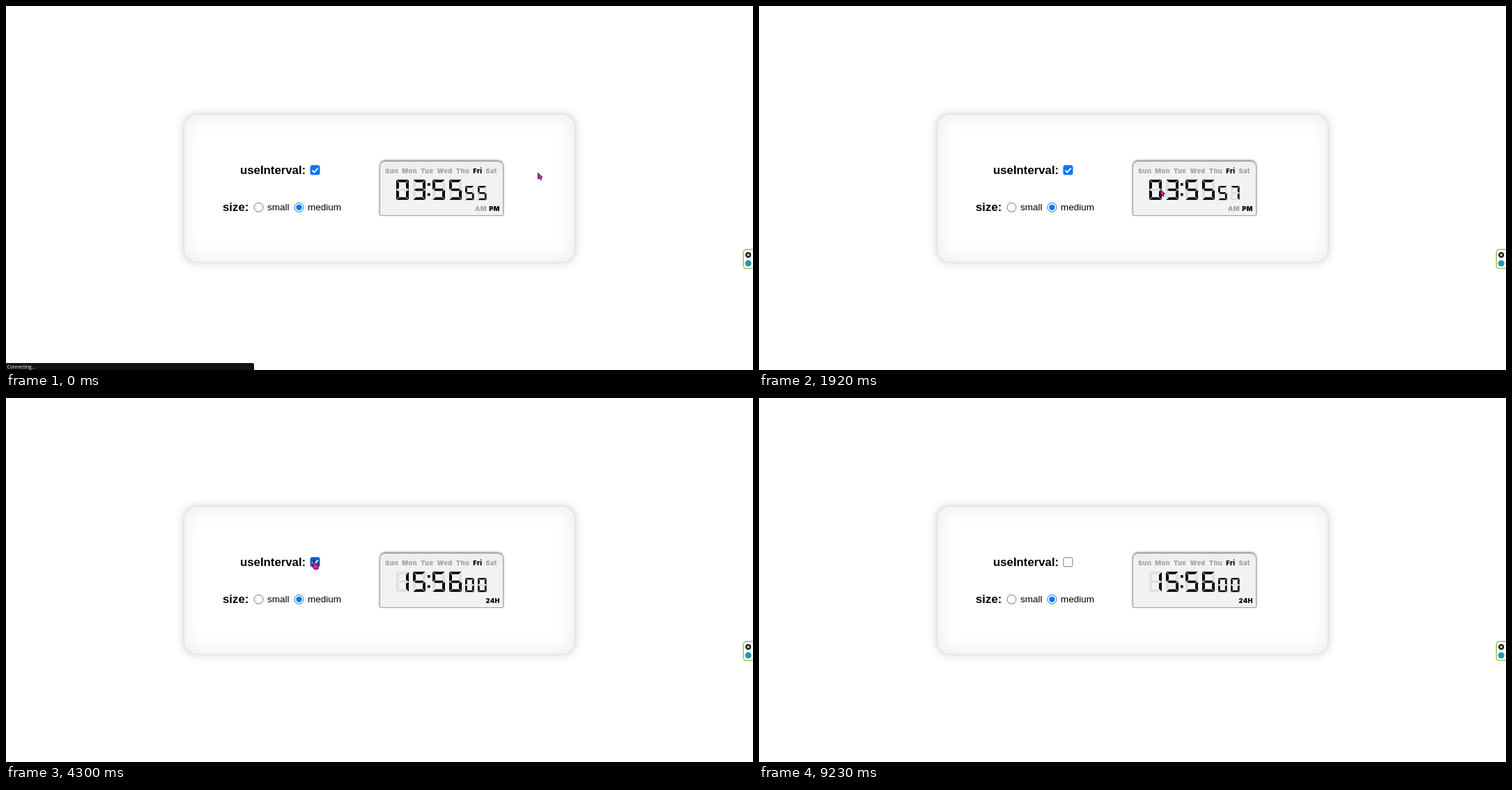
Animation, 1072 px wide and 522 px high, one loop 9.54 s. Source, as an HTML page:

```html
<!DOCTYPE html>
<html lang="en">
<head>
<meta charset="utf-8">
<title>Digital clock</title>
<style>
html, body { margin: 0; width: 1072px; height: 522px; overflow: hidden; background: #fff; }
svg { position: absolute; left: 0; top: 0; }
.card { position: absolute; left: 256px; top: 156px; width: 560px; height: 210.5px; border-radius: 16px;
  box-shadow: 0 0 1px #b4b4a8, 0 0 13px rgba(60, 60, 90, .27), inset 0 0 26px rgba(120, 120, 90, .16); }
.face { position: absolute; left: 536px; top: 222px; width: 178px; height: 79px; box-sizing: border-box;
  border-radius: 8px 8px 2px 2px; border: 1px solid #a5a39c; border-top-color: #8c8c8c;
  background: linear-gradient(#ececee, #f2f2f2 20%, #f2f2f2); box-shadow: 0 -1px 3px rgba(0, 0, 0, .42); }
.days { position: absolute; left: 544px; top: 231px; width: 161px; line-height: 12px;
  display: flex; justify-content: space-between; }
#clock { position: absolute; left: 0; top: 0; width: 1072px; height: 522px; transform-origin: 625px 261px; }
.label { font: bold 16.8px "Liberation Sans", Arial, sans-serif; }
.option { font: 13.5px "Liberation Sans", Arial, sans-serif; }
.tiny { font-family: Inter, "DejaVu Sans", sans-serif; font-size: 9.2px; font-weight: 900; letter-spacing: .4px;
  color: #a6a6a6; fill: currentColor; text-anchor: end; }
.on { color: #000; }
</style>
</head>
<body>
<div class="card"></div>
<div id="clock">
  <div class="face"></div>
  <div class="days tiny">
    <span>Sun</span><span>Mon</span><span>Tue</span><span>Wed</span><span>Thu</span><span class="on">Fri</span><span>Sat</span>
  </div>
  <svg width="1072" height="522">
    <g id="digits"></g>
    <path d="M605 254h3.6v3.8h-3.6zM605 268.5h3.6v3.8h-3.6z"/>
    <g id="half">
      <text class="tiny" x="690" y="293.6">AM</text>
      <text class="tiny on" x="708.8" y="293.6">PM</text>
    </g>
    <text id="full" class="tiny on" x="708.8" y="293.6">24H</text>
  </svg>
</div>
<svg width="1072" height="522">
  <text class="label" x="336" y="241">useInterval:</text>
  <text class="label" x="311" y="293.7">size:</text>
  <text class="option" x="375" y="292.7">small</text>
  <text class="option" x="433" y="292.7">medium</text>
  <rect id="box" x="437" y="228.8" width="13" height="13" rx="2"/>
  <path id="tick" d="M439.5 235.6l2.8 2.9 5.4-6.2" fill="none" stroke="#fff" stroke-width="1.9"/>
  <g id="small"><circle cx="362.5" cy="288.8" r="6.5" fill="#fff"/><circle cx="362.5" cy="288.8" r="4.1"/></g>
  <g id="medium"><circle cx="420.5" cy="288.8" r="6.5" fill="#fff"/><circle cx="420.5" cy="288.8" r="4.1"/></g>

  <rect x="1058.2" y="349.2" width="20" height="27.2" rx="4" fill="#fff" stroke="#8bc34a" stroke-width="1.4"/>
  <circle cx="1065.2" cy="357" r="4" fill="#111"/>
  <path d="M1063.6 355.4l3.2 3.2m0-3.2l-3.2 3.2" stroke="#fff" stroke-width="1.2"/>
  <circle cx="1065.2" cy="369" r="4.5" fill="#2496b4"/>

  <g id="status">
    <path d="M0 512h354q2 0 2 2v8H0z" fill="#131313"/>
    <text x="1.5" y="520" font-size="6.7" font-family="Open Sans, sans-serif" fill="#fff">Connecting...</text>
  </g>
  <g id="cursor" fill="#e81aa8" stroke="#2a0a20" stroke-width=".9" stroke-linejoin="round">
    <path id="arrow" d="M.4.4v8.8l2-1.7 1.7 3 1.5-.8-1.5-2.9 2.8-.3z"/>
    <path id="hand" d="M-1.2 0Q0-1.2 1.1 0V4L5.4 4.9Q6.6 5.2 6.5 6.6L5.8 11.5H.2L-2.4 7.3Q-2.6 5.8-1.2 6.4z"/>
  </g>
</svg>
<script>
const LOOP = 9540;
const $ = id => document.getElementById(id);
const show = (id, visible) => $(id).style.display = visible ? "" : "none";
const clamp = v => Math.max(0, Math.min(1, v));
const ease = v => v * v * (3 - 2 * v);

// Each move eases along a curve to a stop; without a bend it is straight.
const start = [763, 239];
const moves = [
  { from: 820, until: 1500, to: [415, 335], bend: [520, 420] },
  { from: 1500, until: 2360, to: [702, 291], bend: [602, 211] },
  { from: 3350, until: 4300, to: [442, 234], bend: [410, 200] },
  { from: 5350, until: 5800, to: [381, 288] },
  { from: 6970, until: 7360, to: [420, 290] },
  { from: 8110, until: 8370, to: [381, 289] },
  { from: 8950, until: 9240, to: [299, 530] }
];

function pointerAt(t) {
  let at = start;
  for (const { from, until, to, bend } of moves) {
    if (t < from) break;
    const u = ease(clamp((t - from) / (until - from))), v = 1 - u;
    at = at.map((a, k) => v * v * a + 2 * u * v * (bend ? bend[k] : (a + to[k]) / 2) + u * u * to[k]);
  }
  return at;
}

// Seven segments in an 18 x 29 cell, mirrored from three basic shapes.
const flip = (pts, h, v) => pts.map(([x, y]) => [h ? 18 - x : x, v ? 29 - y : y]);
const bar = [[.5, 0], [17.5, 0], [13.7, 3.7], [4.3, 3.7]];
const side = [[0, .6], [4, 4.5], [4, 12.2], [0, 14.1]];
const roof = [[1.4, 14.5], [4.4, 12.7], [13.6, 12.7], [16.6, 14.5]];
const segments = {
  a: bar, b: flip(side, 1, 0), c: flip(side, 1, 1), d: flip(bar, 0, 1),
  e: flip(side, 0, 1), f: side, g: [...roof, ...flip(roof, 1, 1)]
};
const glyphs = ["abcdef", "bc", "abdeg", "abcdg", "bcfg", "acdfg", "acdefg", "abc", "abcdefg", "abcdfg"];

function digit(value, i) {
  const lit = s => glyphs[value].includes(s);
  const shapes = Object.keys(segments).sort((p, q) => lit(p) - lit(q)).map(s =>
    `<polygon points="${segments[s].join(" ")}" fill="${lit(s) ? "#080808" : "#dfdfdf"}"/>`);
  const place = i < 4
    ? `translate(${560 + 24 * i + (i > 1 ? 4 : 0)} 249)`
    : `translate(${659 + 18 * (i - 4)} 258) scale(.7)`;
  return `<g transform="${place}">${shapes.join("")}</g>`;
}

const tone = (checked, hover, press) => checked
  ? (press ? "#378fff" : hover ? "#005cc8" : "#0075ff")
  : (press ? "#8d8d8d" : hover ? "#4f4f4f" : "#767676");

function radio(id, checked, hover, press) {
  const [ring, dot] = $(id).children, color = tone(checked, hover, press);
  ring.setAttribute("stroke", color);
  dot.setAttribute("fill", checked ? color : "none");
}

let shownTime = "";
function draw(t) {
  const [x, y] = pointerAt(t);
  const over = (x0, y0, x1, y1) => x >= x0 && x <= x1 && y >= y0 && y <= y1;
  const between = (from, to) => t >= from && t < to;

  // The clock stops at 56:00 when the checkbox is cleared.
  const ticks = Math.min(5, Math.floor((t + 163) / 843));
  const is24 = t >= 2670;
  const time = (is24 ? "15" : "03") + (ticks > 4 ? "5600" : "55" + (55 + ticks));
  if (time !== shownTime) {
    shownTime = time;
    $("digits").innerHTML = [...time].map(digit).join("");
  }
  show("half", !is24);
  show("full", is24);

  const onBox = over(436, 228, 451, 243);
  const onSmall = over(355, 282, 408, 297), onMedium = over(413, 282, 482, 297);
  const onToggle = over(672, 284, 712, 299);
  const useInterval = t < 4570, isSmall = between(6200, 7610);

  const boxTone = tone(useInterval, onBox, between(4490, 4570));
  $("box").setAttribute("fill", useInterval ? boxTone : "#fff");
  $("box").setAttribute("stroke", boxTone);
  show("tick", useInterval);
  radio("small", isSmall, onSmall, between(6090, 6200));
  radio("medium", !isSmall, onMedium, between(7500, 7610));
  $("clock").style.transform = isSmall ? "scale(.65)" : "none";

  $("status").setAttribute("opacity", clamp((230 - t) / 210));
  const hand = onBox || onSmall || onMedium || onToggle;
  show("hand", hand);
  show("arrow", !hand);
  $("cursor").setAttribute("transform", `translate(${x} ${y})`);
}

function frame() {
  draw(performance.now() % LOOP);
  requestAnimationFrame(frame);
}
frame();
</script>
</body>
</html>
```
